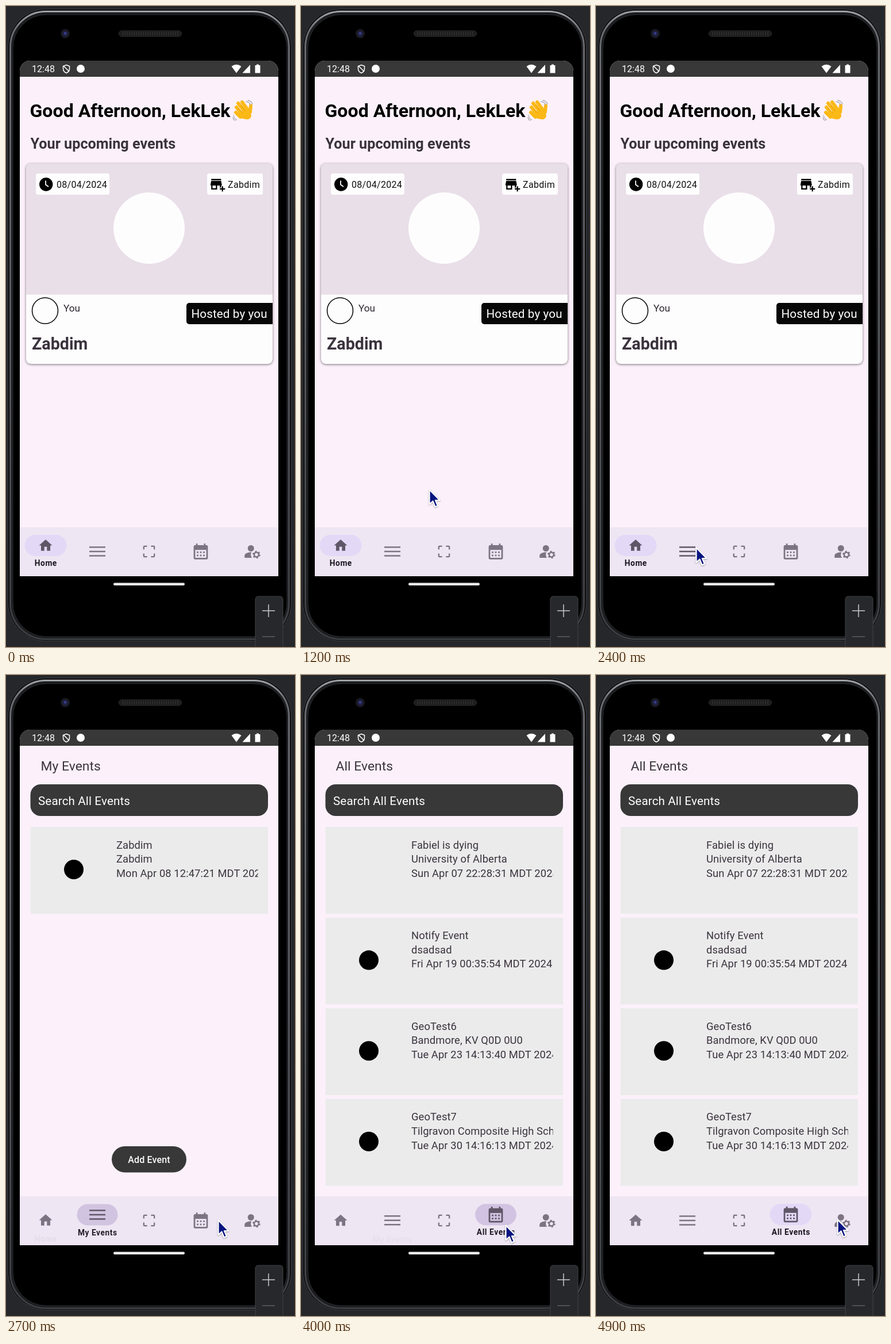
Animation, 503 px wide and 1114 px high, one loop 5 s. Source, as an HTML page:

```html
<!DOCTYPE html>
<html lang="en">
<head>
<meta charset="utf-8">
<title>Events app</title>
<style>
html, body { margin: 0; height: 100%; overflow: hidden; background: #26272b; }
svg { display: block; width: 503px; height: 1114px; font-family: Roboto, sans-serif; }
.b { font-weight: 700; }
.chip { font-size: 16.04px; letter-spacing: .28px; fill: #111; }
.head { font-size: 22.9px; fill: #3a333d; }
.field { font-size: 20.6px; letter-spacing: .13px; fill: #fff; }
.row { font-size: 18.33px; letter-spacing: .1px; fill: #3a333d; }
.label { font-size: 13.75px; letter-spacing: .57px; font-weight: 700; text-anchor: middle; fill: #17131c; }
#card { filter: drop-shadow(0 1px 2px #0008); }
#cursor { filter: drop-shadow(0 1px 1px #0005); }
</style>
</head>
<body>
<svg id="stage" viewBox="0 0 503 1114">
  <defs>
    <linearGradient id="rim" x2="0" y2="1">
      <stop stop-color="#a0a1a5"/><stop offset=".03" stop-color="#6a6b70"/>
      <stop offset=".5" stop-color="#58595e"/><stop offset="1" stop-color="#3c3d41"/>
    </linearGradient>
    <clipPath id="screen"><path d="M24 991V113a18 18 0 0 1 18-18H456a18 18 0 0 1 18 18V991z"/></clipPath>
    <clipPath id="cardClip"><rect x="35" y="274" width="429" height="348" rx="8"/></clipPath>
    <clipPath id="rowClip"><rect x="190" y="264" width="248.5" height="640"/></clipPath>
  </defs>

  <!-- phone body -->
  <rect x="3.5" y="5.5" width="493" height="1098" rx="66" fill="#0b0b0d" stroke="#3c3d41"/>
  <rect x="7.5" y="9.5" width="485" height="1091" rx="62" fill="#1b1c1f" stroke="url(#rim)" stroke-width="3"/>
  <rect x="12" y="15" width="477" height="1081" rx="58" stroke="#2c2d30"/>
  <circle cx="103" cy="48" r="8" fill="#191a20"/>
  <circle cx="103" cy="48" r="4.5" fill="#22244e"/>
  <circle cx="103" cy="47.500" r="2" fill="#3d4291"/>
  <rect x="196.500" y="43" width="109" height="10" rx="5" fill="#1d1d1e" stroke="#2d2d2e"/>
  <path d="M202 48H301" stroke="#2b2b2c" stroke-width="6" stroke-dasharray="2 2"/>
  <rect x="187" y="1002.500" width="124" height="4.500" rx="2.250" fill="#ececec"/>

  <!-- zoom panel -->
  <rect x="434" y="1026" width="48" height="100" rx="5" fill="#27282b" stroke="#414348"/>
  <path d="M446 1051h22M457 1040v22" stroke="#c8cacf" stroke-width="1.500"/>
  <path d="M446 1096h22" stroke="#5c5e63" stroke-width="1.500"/>

  <g clip-path="url(#screen)">
    <path fill="#fcf1fb" d="M24 95h450v896H24z"/>
    <path fill="#383838" d="M24 95h450v28H24z"/>
    <g fill="#fff">
      <text x="45" y="115" font-size="16.04">12:48</text>
      <path d="M105 102.500l5.500 2v4.500q0 5-5.500 7.500q-5.500-2.500-5.500-7.500v-4.500zM100 104l10 10" fill="none" stroke="#fff" stroke-width="1.500"/>
      <circle cx="130" cy="109" r="7"/>
      <path d="M392.500 105q8.500-6.500 17 0l-8.500 11.500zM411.500 116.500h13.500V102zM433.500 103h2.500v-1.500h4v1.500h2.500v13.500h-9z"/>
    </g>
    <g id="home"></g>
    <g id="mine"></g>
    <g id="all"></g>
    <path fill="#eee6f3" d="M24 906h450v85H24z"/>
    <g id="nav"></g>
  </g>
  <path id="cursor" d="M1.500 2.500V28L7.500 22.500 11.500 32.500 16 30.500 12 21H19.500z" fill="#08147f" stroke="#fff" stroke-width="2.200" stroke-linejoin="round"/>
</svg>
<script>
const $ = id => document.getElementById(id);
const clamp = v => Math.max(0, Math.min(1, v));
const text = (x, y, cls, s) => `<text x="${x}" y="${y}" class="${cls}">${s}</text>`;
const box = (x, y, w, h, r, fill) => `<rect x="${x}" y="${y}" width="${w}" height="${h}" rx="${r}" fill="${fill}"/>`;

const hand = `<g fill="none" stroke-linecap="round" stroke="#fbb917">
  <path stroke-width="6" d="M401 176l11 14M404 169l13 16M411 167l11 15M400 185l8 8M425 184l1-11"/>
  <path stroke-width="14" d="M414 189l6 1"/>
  <path stroke="#e59600" stroke-width="1" d="M405 178l7 8M409 173l7 9"/>
  <path stroke="#a9adb2" stroke-width="1.300" d="M418 166q6 1 8 6M421 164q6 1 8 6M396 190q1 6 6 8M395 194q1 4 4 5"/></g>`;

$('home').innerHTML =
  `<text x="41.500" y="193" class="b" font-size="32.080">Good Afternoon, LekLek</text>` + hand +
  `<text x="42.500" y="248" class="b" font-size="25.200" fill="#3a333d">Your upcoming events</text>
  <g id="card"><g clip-path="url(#cardClip)">` +
  box(35, 274, 429, 348, 8, '#fefdfe') +
  box(35, 274, 429, 227.5, 0, '#e9dfe8') +
  `<circle cx="249" cy="386" r="62" fill="#fefdfe"/>` +
  box(52, 291, 128, 37, 4, '#fefdfe') + box(350, 291, 97, 37, 4, '#fefdfe') +
  `<circle cx="69.700" cy="310" r="11.700"/>
  <path d="M69 303.500v7l5 3.500" fill="none" stroke="#fff" stroke-width="1.800"/>
  <path transform="translate(354.900 296) scale(1.146)" fill-rule="evenodd"
    d="M2 4h15v2H2zM15 17h2v-3h1v-2l-1-5H2l-1 5v2h1v6h9v-6h4zM9 18H4v-4h5zM20 18v-3h-2v3h-3v2h3v3h2v-3h3v-2z"/>` +
  text(88, 316, 'chip', '08/04/2024') + text(386, 316, 'chip', 'Zabdim') +
  `<circle cx="68" cy="529.500" r="22.500" fill="none" stroke="#000" stroke-width="1.500"/>
  <text x="100" y="531" font-size="17.200" fill="#2d2830">You</text>` +
  box(314, 516, 160, 37, 5, '#070707') + text(322.5, 542, 'field', 'Hosted by you') +
  `<text x="45" y="597" class="b" font-size="28.600" fill="#3a333d">Zabdim</text></g></g>`;

function listPage(title, rows) {
  return text(60.5, 165.500, 'head', title) + box(42.5, 190, 413.5, 55, 18, '#383838') +
    text(56, 226, 'field', 'Search All Events') +
    rows.map(([icon, ...lines], i) => {
      const y = 264 + i * 157.6;
      return box(42.5, y, 413.5, 151, 0, '#ebebeb') +
        (icon ? `<circle cx="118" cy="${y + 74}" r="17"/>` : '') +
        `<g clip-path="url(#rowClip)">` +
        lines.map((s, k) => text(192, y + 37.5 + k * 24.6, 'row', s)).join('') + '</g>';
    }).join('');
}

$('mine').innerHTML = listPage('My Events', [
  [1, 'Zabdim', 'Zabdim', 'Mon Apr 08 12:47:21 MDT 2024']
]) + box(184, 819, 130, 45.5, 22.7, '#383838') +
  `<text x="249" y="848" text-anchor="middle" font-size="16.040" font-weight="500" letter-spacing=".110" fill="#fff">Add Event</text>`;

$('all').innerHTML = listPage('All Events', [
  [0, 'Fabiel is dying', 'University of Alberta', 'Sun Apr 07 22:28:31 MDT 2024'],
  [1, 'Notify Event', 'dsadsad', 'Fri Apr 19 00:35:54 MDT 2024'],
  [1, 'GeoTest6', 'Bandmore, KV Q0D 0U0', 'Tue Apr 23 14:13:40 MDT 2024'],
  [1, 'GeoTest7', 'Tilgravon Composite High Sch', 'Tue Apr 30 14:16:13 MDT 2024']
]);

// icons are drawn around their own centre
const corner = a => `<path transform="rotate(${a})" d="M-8-3V-7a1 1 0 0 1 1-1H-3" fill="none" stroke="currentColor" stroke-width="2"/>`;
const icons = [
  [1.146, '<path d="M-2 8V2H2V8H7V0H10L0-9-10 0H-7V8z"/>'],
  [1, '<path d="M-14-8.700h28v2.400h-28zM-14-1.200h28v2.400h-28zM-14 6.300h28v2.400h-28z"/>'],
  [1.146, [0, 90, 180, 270].map(corner).join('')],
  [1.375, `<path fill-rule="evenodd" d="M7-8H6v-2H4v2H-4v-2H-6v2H-7a2 2 0 0 0-2 2V8a2 2 0 0 0 2 2H7a2 2 0 0 0 2-2V-6a2 2 0 0 0-2-2zM7 8H-7V-2H7z"/>
    <path d="M-5 1H6M-5 5H6" stroke="currentColor" stroke-width="2" stroke-dasharray="2"/>`],
  [1.375, `<circle cx="-2" cy="-4" r="4"/><path d="M-1.300 1C-4 .800-6.500 1.500-8.600 2.800Q-10 3.700-10 5.300V8H-.700Q-3.200 4.500-1.300 1z"/>
    <g fill="none" stroke="currentColor"><circle cx="5" cy="4" r="2.900" stroke-width="1.800"/>
    <circle cx="5" cy="4" r="4.200" stroke-width="1.500" stroke-dasharray="2.100 2.298"/></g>`]
];
const labels = ['Home', 'My Events', '', 'All Events', ''];
$('nav').innerHTML = icons.map(([k, art], i) => {
  const x = 69 + i * 90;
  return `<g transform="translate(${x} 0)"><rect class="pill" x="-36.500" y="-18.500" width="73" height="37" rx="18.500"/>
    <g class="icon" fill="currentColor"><g transform="scale(${k})">${art}</g></g>${text(.3, 0, 'label', labels[i])}</g>`;
}).join('');
const items = [...$('nav').children].map(g => ['pill', 'icon', 'label'].map(c => g.querySelector('.' + c)));

const path = [[1000, 330, 765], [1200, 222, 838], [1700, 173, 939], [2500, 173, 939], [2600, 280, 972],
  [2700, 368, 945], [3000, 391, 962], [3500, 355, 954], [4000, 355, 954], [4100, 358, 954], [4300, 358, 954], [4700, 419, 944]];

function cursorAt(t) {
  const n = path.findIndex(p => p[0] > t);
  if (n < 0) return path[path.length - 1].slice(1);
  const [a, b] = [path[n - 1], path[n]], u = (t - a[0]) / (b[0] - a[0]);
  return [1, 2].map(k => a[k] + (b[k] - a[k]) * u);
}

const easeOut = (t, start, len) => 1 - (1 - clamp((t - start) / len)) ** 2;
const show = (el, on) => el.setAttribute('visibility', on ? 'visible' : 'hidden');
const mix = (a, b, u) => `rgb(${a.map((v, k) => Math.round(v + (b[k] - v) * u))})`;

function draw(t) {
  show($('home'), t < 2600);
  show($('mine'), t >= 2600 && t < 4000);
  show($('all'), t >= 4000);

  const toMine = easeOut(t, 2450, 320), toAll = easeOut(t, 3750, 300);
  const chosen = [1 - toMine, toMine * (1 - toAll), 0, toAll, 0];
  const ripple = [0, t < 2500 ? 0 : 1 - clamp((t - 2750) / 250), 0, t < 3800 ? 0 : 1 - clamp((t - 4150) / 250), 0];
  const pressed = [0, t >= 2200 && t < 2800, 0, t >= 3500 && t < 4300, 0];
  items.forEach(([pill, icon, label], i) => {
    const s = chosen[i], y = 948 - 10.5 * s;
    pill.setAttribute('transform', `translate(0 ${y}) scale(${.4 + .6 * s} 1)`);
    pill.setAttribute('opacity', s);
    pill.setAttribute('fill', mix([227, 217, 247], [208, 195, 225], ripple[i]));
    icon.setAttribute('transform', `translate(0 ${y})`);
    icon.setAttribute('color', mix([124, 116, 130], [95, 86, 103], pressed[i] ? 1 : s));
    label.setAttribute('transform', `translate(0 ${973 + 13 * (1 - s)})`);
    label.setAttribute('opacity', s);
  });

  show($('cursor'), t >= 1000);
  if (t >= 1000) $('cursor').setAttribute('transform', `translate(${cursorAt(t)})`);
}

const begin = performance.now();
function tick() {
  const t = (performance.now() - begin) % 5000;
  draw(Math.floor(t / 100) * 100);
  requestAnimationFrame(tick);
}
tick();
</script>
</body>
</html>
```
